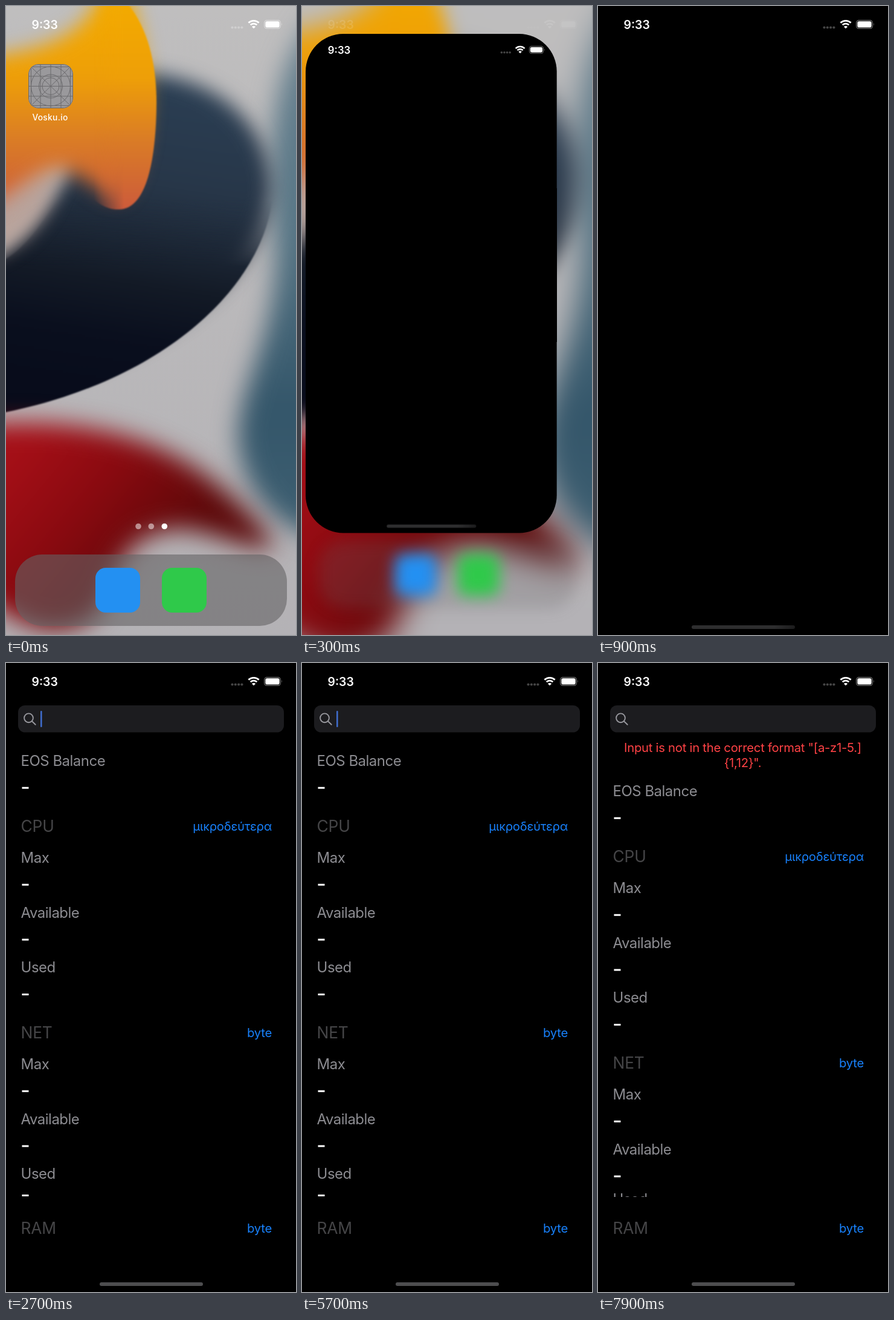
Recreate the animation shown at these times as an HTML page. Size 480 by 1039 pixels, loop 8000 ms.

```html
<!DOCTYPE html>
<html lang="en">
<head>
<meta charset="utf-8">
<title>App launch</title>
<style>
  html, body { margin: 0; width: 100%; height: 100%; overflow: hidden; background: #000; }
  .stage { position: relative; width: 480px; height: 1039px; overflow: hidden; }
  svg { position: absolute; left: 0; top: 0; display: block; }
  text { font-family: Inter, Roboto, sans-serif; }

  /* every track is an 8 s loop on a 100 ms (1.25 %) clock */
  .wall, .icons, .dock, .bar, .app, .content, .grip, .caret, .error, .rows, .last {
    animation: 8s step-end infinite;
  }
  .wall, .icons { transform-origin: 240px 519px; }
  .wall { animation-name: wall; }
  .icons { animation-name: icons; }
  .dock { animation-name: dock; }
  .bar { animation-name: bar; }
  @keyframes wall {
    0% { transform: none; filter: none; }
    2.5% { transform: scale(1.03); filter: blur(4px); }
    3.75% { transform: scale(1.08); filter: blur(13px); }
    5% { transform: scale(1.1); filter: blur(16px); }
  }
  @keyframes icons {
    0% { transform: none; filter: none; }
    2.5% { transform: scale(.98); filter: blur(4px); }
    3.75% { transform: scale(.943); filter: blur(13px); }
    5% { transform: scale(.93); filter: blur(16px); }
  }
  @keyframes dock { 0% { opacity: 1 } 2.5% { opacity: .8 } 3.75% { opacity: .4 } 5% { opacity: .2 } }
  @keyframes bar { 0% { opacity: 1 } 2.5% { opacity: .5 } 3.75% { opacity: .12 } 5% { opacity: 0 } }

  .app {
    position: absolute; left: 0; top: 0; width: 480px; height: 1039px;
    overflow: hidden; background: #000; transform-origin: 0 0; animation-name: open;
  }
  @keyframes open {
    0% { opacity: 0; transform: translate(37px, 96px) scale(.154); height: 480px; border-radius: 110px; }
    2.5% { opacity: .85; transform: translate(26px, 100px) scale(.408); height: 725px; border-radius: 98px; }
    3.75% { opacity: 1; transform: translate(6px, 46px) scale(.866); height: 952px; border-radius: 72px; }
    5% { opacity: 1; transform: translate(1px, 5px) scale(.975); height: 1031px; border-radius: 56px; }
    7.5%, 100% { opacity: 1; transform: none; height: 1039px; border-radius: 0; }
  }
  .grip {
    position: absolute; left: 155px; bottom: 10px; width: 171px; height: 6px;
    border-radius: 3px; animation-name: grip;
  }
  @keyframes grip {
    0% { background: linear-gradient(90deg, #2e2e2f 80%, #1c1c1d); }
    12.5% { background: #353536; }
    13.75% { background: #404042; }
    15% { background: #48484a; }
    16.25%, 100% { background: #4d4d4f; }
  }
  .content { animation-name: appear; }
  @keyframes appear {
    0% { opacity: 0 } 12.5% { opacity: .2 } 13.75% { opacity: .55 } 15% { opacity: .85 } 16.25%, 100% { opacity: 1 }
  }

  .caret { animation-name: focus; }
  @keyframes focus { 0% { opacity: 0 } 26.25%, 100% { opacity: 1 } }
  .caret rect { animation: blink 1s step-end infinite; }
  @keyframes blink {
    0% { opacity: 0 } 10% { opacity: .4 } 20% { opacity: .9 } 30% { opacity: 1 }
    70% { opacity: .92 } 80% { opacity: .5 } 90%, 100% { opacity: 0 }
  }

  .error { animation-name: error; }
  .rows { animation-name: push; --dy: 50px; }
  .last { animation-name: push; --dy: 42px; }
  @keyframes error { 0% { opacity: 0 } 86.25%, 100% { opacity: 1 } }
  @keyframes push { 0% { transform: none } 86.25%, 100% { transform: translateY(var(--dy)) } }

  .label { font-size: 24px; letter-spacing: -.52px; fill: #8c8c91; }
  .head { font-size: 26.4px; letter-spacing: -.3px; fill: #454547; }
  .unit { font-size: 20.3px; letter-spacing: -.25px; fill: #1880fa; text-anchor: end; }
  .error text { font-size: 20.3px; letter-spacing: -.27px; fill: #ff4245; text-anchor: middle; }
  .dash { fill: #fff; }
</style>
</head>
<body>
<div class="stage">
  <svg width="480" height="1039" viewBox="0 0 480 1039">
    <defs>
      <linearGradient id="base" x2="0" y2="1"><stop stop-color="#c0bfbf"/><stop offset="1" stop-color="#b3b1b5"/></linearGradient>
      <linearGradient id="teal" gradientUnits="userSpaceOnUse" x1="0" y1="20" x2="0" y2="880">
        <stop stop-color="#6a8391"/><stop offset=".4" stop-color="#567585"/><stop offset=".75" stop-color="#34566a"/><stop offset="1" stop-color="#3f6072"/>
      </linearGradient>
      <linearGradient id="navy" gradientUnits="userSpaceOnUse" x1="250" y1="110" x2="170" y2="640">
        <stop stop-color="#2b3f54"/><stop offset=".35" stop-color="#273648"/><stop offset=".65" stop-color="#131a26"/><stop offset=".82" stop-color="#0a0f1e"/><stop offset="1" stop-color="#080c1b"/>
      </linearGradient>
      <linearGradient id="amber" gradientUnits="userSpaceOnUse" x1="0" y1="0" x2="0" y2="340">
        <stop stop-color="#f3aa00"/><stop offset=".35" stop-color="#ee9f08"/><stop offset=".65" stop-color="#da7c26"/><stop offset="1" stop-color="#cc5a3c"/>
      </linearGradient>
      <linearGradient id="red" gradientUnits="userSpaceOnUse" x1="20" y1="730" x2="260" y2="930">
        <stop stop-color="#a50f17"/><stop offset=".45" stop-color="#8a0a10"/><stop offset="1" stop-color="#5c0809"/>
      </linearGradient>
      <linearGradient id="down" gradientUnits="userSpaceOnUse" x1="0" y1="320" x2="0" y2="430"><stop/><stop offset="1" stop-color="#fff"/></linearGradient>
      <linearGradient id="right" gradientUnits="userSpaceOnUse" x1="145" y1="0" x2="195" y2="0"><stop/><stop offset="1" stop-color="#fff"/></linearGradient>
      <mask id="low" maskUnits="userSpaceOnUse" x="-80" y="-80" width="640" height="1200"><path d="M-80-80H560V1120H-80Z" fill="url(#down)"/></mask>
      <mask id="east" maskUnits="userSpaceOnUse" x="-80" y="-80" width="640" height="1200"><path d="M-80-80H560V1120H-80Z" fill="url(#right)"/></mask>
      <filter id="soft" filterUnits="userSpaceOnUse" x="-140" y="-140" width="760" height="1320" color-interpolation-filters="sRGB"><feGaussianBlur stdDeviation="16"/></filter>
      <filter id="hazy" filterUnits="userSpaceOnUse" x="-140" y="-140" width="760" height="1320" color-interpolation-filters="sRGB"><feGaussianBlur stdDeviation="20"/></filter>
      <filter id="crisp" filterUnits="userSpaceOnUse" x="-140" y="-140" width="760" height="1320" color-interpolation-filters="sRGB"><feGaussianBlur stdDeviation="1.2"/></filter>
      <clipPath id="tile"><rect x="37" y="96" width="74" height="73" rx="17"/></clipPath>
      <clipPath id="view"><rect y="116" width="480" height="766"/></clipPath>

      <g id="status" fill="#fff">
        <text x="42.5" y="37.7" font-size="19.4" font-weight="600">9:33</text>
        <g opacity=".27"><circle cx="374.5" cy="35.5" r="2.1"/><circle cx="379.8" cy="35.5" r="2.1"/><circle cx="385.1" cy="35.5" r="2.1"/><circle cx="390.4" cy="35.5" r="2.1"/></g>
        <path d="M401.4 27.8A12.4 12.4 0 0 1 418.6 27.8M404.7 31.3A7.6 7.6 0 0 1 415.3 31.3" fill="none" stroke="#fff" stroke-width="2.9"/>
        <path d="M410 37.3L406.9 34.2A4.4 4.4 0 0 1 413.1 34.2Z"/>
        <rect x="427.6" y="23.6" width="26.8" height="13.6" rx="4.2" fill="none" stroke="#fff" stroke-opacity=".45" stroke-width="1.2"/>
        <rect x="429.3" y="25.3" width="23.4" height="10.2" rx="2.8"/>
        <path d="M456 28.2Q457.8 30.4 456 32.6Z" opacity=".5"/>
      </g>
    </defs>

    <g class="wall">
      <rect x="-80" y="-80" width="640" height="1200" fill="url(#base)"/>
      <path d="M540-10C425 90 434 250 446 410C446 550 388 620 384 710C390 795 440 865 540 885Z" fill="url(#teal)" filter="url(#hazy)"/>
      <g fill="url(#navy)">
        <path d="M170 112C335 96 442 190 438 310C424 440 250 600 -60 640V430C30 405 60 320 100 285Z" filter="url(#soft)"/>
        <g mask="url(#low)"><path d="M120 285L441 285C452 436 276 635 -60 681V440C50 420 60 330 120 285Z" filter="url(#crisp)"/></g>
      </g>
      <path d="M-60 335C10 320 50 270 85 280C70 340 40 395 -60 425Z" fill="#b9a39b" filter="url(#soft)"/>
      <g fill="url(#amber)">
        <path d="M165-60C148 30 105 72 -60 86V345C20 320 45 270 95 268C140 285 155 312 185 318C220 300 235 200 232 130C230 60 210 0 190-60Z" filter="url(#soft)"/>
        <g mask="url(#east)"><path d="M140-60H150L201-4C238 40 250 105 249 165C248 250 234 336 187 336C160 337 140 316 112 292V60Z" filter="url(#crisp)"/></g>
      </g>
      <path d="M-60 694C90 676 240 702 342 784C395 826 432 866 444 896C385 898 340 864 280 864C220 872 195 900 172 960C155 1010 130 1030 70 1030C30 1025 0 1000 -60 970Z" fill="url(#red)" filter="url(#hazy)"/>
    </g>

    <g class="icons">
      <g clip-path="url(#tile)" fill="none" stroke="#6b6a6d">
        <rect x="37" y="96" width="74" height="73" fill="#9a999c" stroke="none"/>
        <path d="M41.5 96V169M57 96V169M74 96V169M91 96V169M106.5 96V169M37 100.5H111M37 116H111M37 132.5H111M37 149H111M37 164.5H111M37 96L111 169M111 96L37 169"/>
        <circle cx="74" cy="132.5" r="32.5"/><circle cx="74" cy="132.5" r="19.5"/><circle cx="74" cy="132.5" r="14"/>
        <rect x="37.5" y="96.5" width="73" height="72" rx="16.5"/>
      </g>
      <text x="73" y="188.5" font-size="13.8" font-weight="500" letter-spacing=".3" fill="#fff" text-anchor="middle">Vosku.io</text>
      <g fill="#fff"><circle cx="219" cy="859.5" r="4.8" opacity=".5"/><circle cx="240.3" cy="859.5" r="4.8" opacity=".5"/><circle cx="262.3" cy="859.5" r="4.8"/></g>
      <rect class="dock" x="15" y="906" width="450" height="118" rx="45" fill="#656365" fill-opacity=".6"/>
      <rect x="148" y="928" width="74" height="74" rx="17" fill="#2390f2"/>
      <rect x="258" y="928" width="74" height="74" rx="17" fill="#2fc94a"/>
    </g>
    <use href="#status" class="bar"/>
  </svg>

  <div class="app">
    <svg width="480" height="1039" viewBox="0 0 480 1039">
      <use href="#status"/>
      <g class="content">
        <rect x="20" y="70" width="440" height="44.5" rx="11.5" fill="#1c1c1f"/>
        <g fill="none" stroke="#98989e" stroke-width="1.9" stroke-linecap="round"><circle cx="37.5" cy="90.8" r="7.4"/><path d="M43 96.3L48.7 101.8"/></g>
        <g class="caret"><rect x="57" y="79" width="2.6" height="27" rx="1.2" fill="#4374dc"/></g>
        <g class="error">
          <text x="239.5" y="147">Input is not in the correct format "[a-z1-5.]</text>
          <text x="239.5" y="171.5">{1,12}".</text>
        </g>
        <g clip-path="url(#view)">
          <g class="rows">
            <text class="label" x="24.6" y="170">EOS Balance</text>
            <text class="head" x="24.6" y="279">CPU</text>
            <text class="unit" x="440" y="276.5">μικροδεύτερα</text>
            <text class="label" x="24.6" y="330">Max</text>
            <text class="label" x="24.6" y="420.5">Available</text>
            <text class="label" x="24.6" y="511.2">Used</text>
            <text class="head" x="24.6" y="620">NET</text>
            <text class="unit" x="440" y="617.5">byte</text>
            <text class="label" x="24.6" y="671">Max</text>
            <text class="label" x="24.6" y="761.5">Available</text>
            <path class="dash" d="M26.5 204.7h11v3h-11zM26.5 364.7h11v3h-11zM26.5 455.4h11v3h-11zM26.5 546h11v3h-11zM26.5 705.7h11v3h-11zM26.5 796.4h11v3h-11z"/>
          </g>
          <g class="last">
            <text class="label" x="24.6" y="852.3">Used</text>
            <path class="dash" d="M26.5 878h11v3h-11z"/>
          </g>
        </g>
        <text class="head" x="24.6" y="943">RAM</text>
        <text class="unit" x="440" y="940.5">byte</text>
      </g>
    </svg>
    <div class="grip"></div>
  </div>
</div>
</body>
</html>
```
